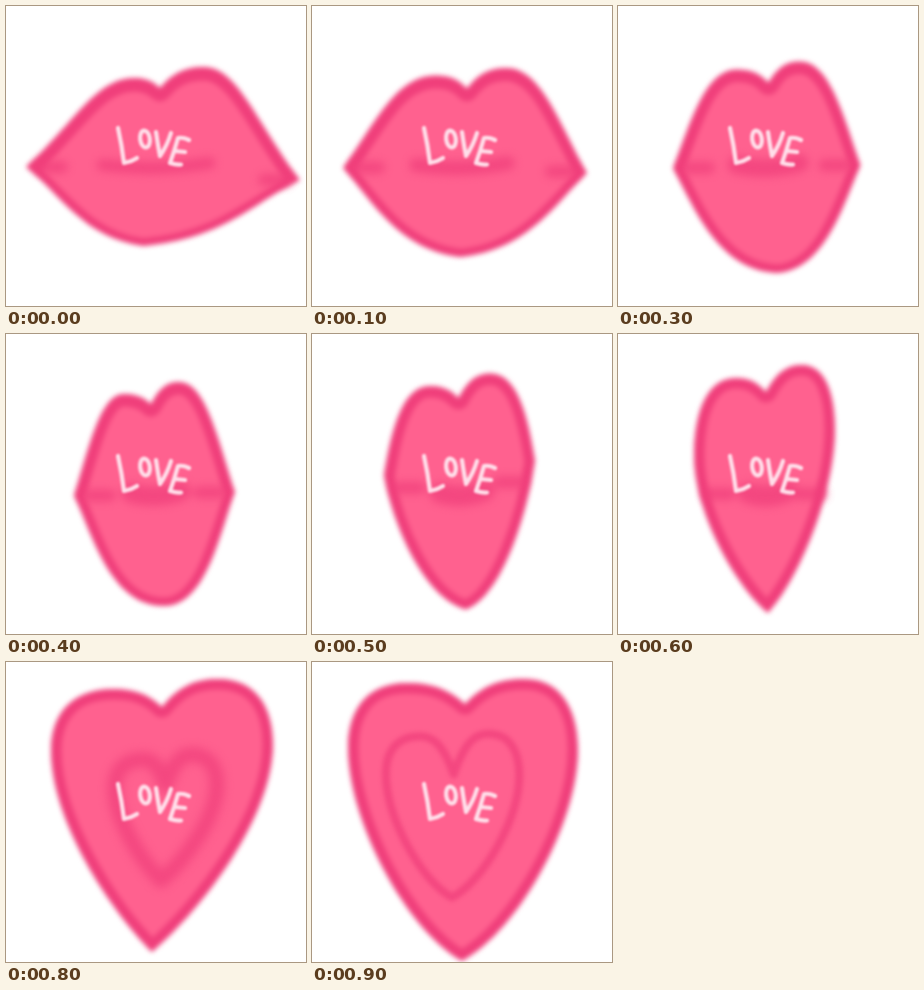
These frames come from a looping animation (300 by 300 pixels, 1 s). An HTML page:

```html
<!DOCTYPE html>
<html lang="en">
<head>
<meta charset="utf-8">
<title>Lips to heart</title>
<style>
html, body { margin: 0; width: 100%; height: 100%; overflow: hidden; background: #fff; }
svg { display: block; width: 100vw; height: 100vh; }
path, ellipse { stroke-linecap: round; stroke-linejoin: round; }
</style>
</head>
<body>
<svg viewBox="0 0 300 300">
  <defs>
    <filter id="edge" filterUnits="userSpaceOnUse" x="-20" y="-20" width="340" height="340" color-interpolation-filters="sRGB">
      <feGaussianBlur stdDeviation="2.7"/>
    </filter>
    <filter id="soft" filterUnits="userSpaceOnUse" x="-20" y="-20" width="340" height="340" color-interpolation-filters="sRGB">
      <feGaussianBlur id="softness"/>
    </filter>
    <filter id="chalk" filterUnits="userSpaceOnUse" x="90" y="100" width="120" height="80" color-interpolation-filters="sRGB">
      <feGaussianBlur stdDeviation="1.25"/>
    </filter>
    <clipPath id="clip"><path id="mask"/></clipPath>
  </defs>
  <g filter="url(#edge)">
    <g clip-path="url(#clip)">
      <path id="body" fill="#ff618f"/>
      <path id="rim" fill="none" stroke="#f03f7b" stroke-width="21"/>
    </g>
  </g>
  <g fill="none" stroke="#f03f7b" opacity=".75" filter="url(#soft)">
    <path id="creases" stroke-width="12"/>
    <path id="shade"/>
  </g>
  <g fill="none" stroke="#ffdfea" stroke-width="4.2" filter="url(#chalk)" role="img" aria-label="LOVE">
    <path d="M112 122Q116 140 118 157Q125 156 131 152"/>
    <ellipse cx="139" cy="133" rx="4.800" ry="8.500" transform="rotate(-8 139 133)"/>
    <path d="M150 126Q152 140 154 150Q161 140 165 127"/>
    <path d="M183 134Q177 131 172 132Q168 146 164 157Q170 159 175 158.500M169 145L179 146"/>
  </g>
</svg>
<script>
const $ = id => document.getElementById(id);
const STEP = 100, STEPS = 10, HEART_STEP = 7;

// points: notch, left lobe, left side, bottom, right side, right lobe.
// lips: how pointed the sides are; belly: how full the lower curve is.
const poses = [
  { step: 0, lips: 1, belly: .7, points: [[154, 82], [128, 72], [20, 161], [137, 240], [294, 174], [198, 61]] },
  { step: 2, lips: .6, belly: .85, points: [[156, 83], [120, 67], [42, 163], [160, 262], [256, 160], [190, 63]] },
  { step: 4, lips: .7, belly: 1, points: [[145, 70], [118, 60], [68, 162], [158, 272], [229, 158], [173, 48]] },
  { step: 6, lips: 0, belly: .5, points: [[148, 58], [118, 44], [76, 122], [150, 279], [217, 95], [184, 31]] },
  { step: 7, lips: 0, belly: .3, points: [[146, 48], [102, 39], [57, 88], [146, 280], [244, 85], [183, 22]], heart: [149, 135] },
  { step: 8, lips: 0, belly: .4, points: [[156, 45], [108, 27], [45, 88], [146, 290], [267, 82], [212, 17]], heart: [157, 154] },
  { step: 9, lips: 0, belly: .6, points: [[153, 42], [95, 21], [36, 85], [150, 299], [266, 88], [212, 17]], heart: [140, 149] }
];

const mix = (a, b, k) => Array.isArray(a) ? a.map((v, i) => mix(v, b[i], k)) : a + (b - a) * k;
// A point part of the way from a to b, with separate shares for x and y.
const toward = (a, b, kx, ky) => [mix(a[0], b[0], kx), mix(a[1], b[1], ky)];

function outline({ points, lips, belly }) {
  const [notch, lobeL, sideL, bottom, sideR, lobeR] = points;
  const half = (lobe, side) => [
    notch, toward(notch, lobe, .3, .75), toward(notch, lobe, .6, 1),
    lobe, toward(lobe, side, .75 - .4 * lips, 0), toward(side, lobe, .45 * lips, .5),
    side, toward(side, bottom, .3 * lips, .35),
    toward(bottom, side, .3 + .3 * belly, .35 * (1 - belly)), bottom
  ];
  const right = half(lobeR, sideR).reverse();
  return `M${notch}C${half(lobeL, sideL).slice(1).join(" ")} ${right.slice(1).join(" ")}Z`;
}

function poseAt(step) {
  const i = poses.findLastIndex(p => p.step <= step);
  const a = poses[i], b = poses[i + 1];
  if (a.step === step) return a;
  const k = (step - a.step) / (b.step - a.step);
  const blend = key => mix(a[key], b[key], k);
  return { lips: blend("lips"), belly: blend("belly"), points: blend("points") };
}

function setShade(creases, d, width, blur) {
  $("creases").setAttribute("d", creases);
  $("shade").setAttribute("d", d);
  $("shade").setAttribute("stroke-width", width);
  $("softness").setAttribute("stdDeviation", blur);
}

function drawMouth({ points, lips }) {
  const left = points[2], right = points[4];
  const width = right[0] - left[0];
  const reach = 20 + .25 * (width - 141);
  const crease = ([x, y], dir) => `M${x + 14 * dir} ${mix(160, y, lips)}h${22 * dir}`;
  setShade(crease(left, 1) + crease(right, -1),
    `M${150 - reach} 159Q150 166 ${150 + reach} 157`, 30 - .065 * width, 4);
}

// The inner heart is a small copy of the outline with a deeper notch.
function drawHeart(pose, age) {
  const scale = .34 + .12 * age;
  const points = pose.points.map(p => p.map((v, i) => pose.heart[i] + (v - 150) * scale));
  points[0][1] += 10 + 8 * age;
  setShade("", outline({ ...pose, points }), 22 - 7 * age, 7 - 2.4 * age);
}

function draw(ms) {
  const step = Math.floor(ms / STEP) % STEPS;
  const pose = poseAt(step);
  const d = outline(pose);
  for (const id of ["mask", "body", "rim"]) $(id).setAttribute("d", d);
  $("rim").setAttribute("transform", `translate(0 ${3 * pose.lips})`);
  if (pose.heart) drawHeart(pose, step - HEART_STEP);
  else drawMouth(pose);
}

const start = performance.now();
function tick() {
  draw(performance.now() - start);
  requestAnimationFrame(tick);
}
tick();
</script>
</body>
</html>
```
